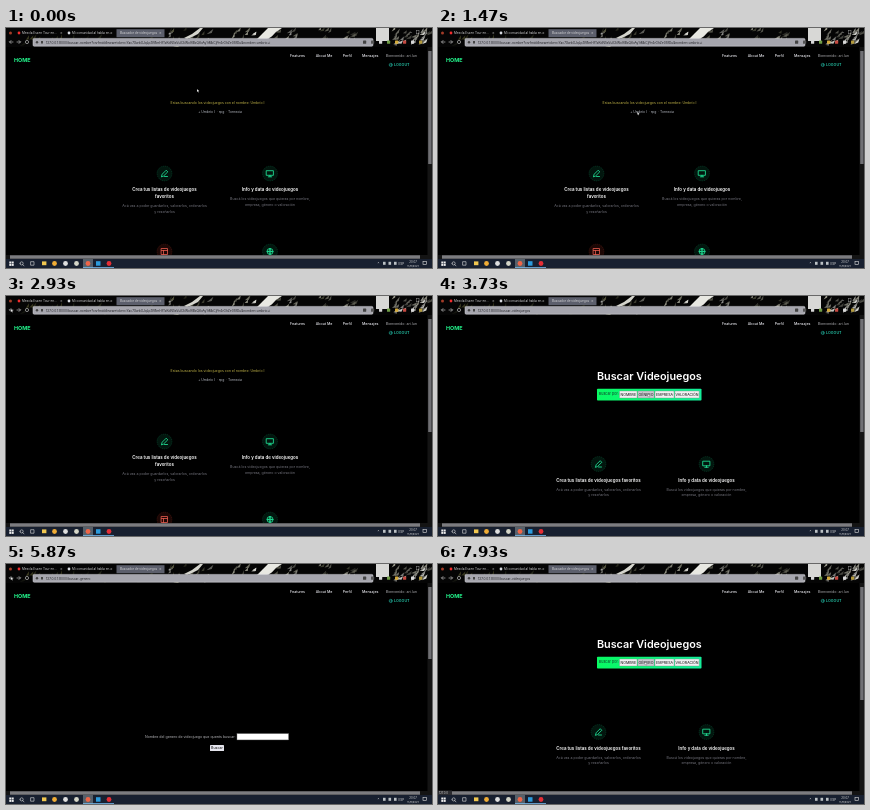
An HTML page that plays this animation: 426 px wide and 240 px high, repeating every 8000 ms.

```html
<!DOCTYPE html>
<html lang="es">
<head>
<meta charset="utf-8">
<style>
html, body { margin: 0; width: 100%; height: 100%; overflow: hidden; background: #000; }
svg { display: block; width: 100vw; height: 100vh; }
text { font-family: Inter, sans-serif; white-space: pre; }
</style>
</head>
<body>
<svg id="stage" viewBox="0 0 426 240">
  <defs>
    <linearGradient id="bar"><stop stop-color="#08fa62"/><stop offset="1" stop-color="#14ee9a"/></linearGradient>
    <clipPath id="view"><rect y="19" width="426" height="208"/></clipPath>
  </defs>
</svg>
<script>
const stage = document.getElementById('stage');
const LOOP = 8000;

function add(parent, tag, attrs, content) {
  const node = document.createElementNS('http://www.w3.org/2000/svg', tag);
  for (const key in attrs) node.setAttribute(key, attrs[key]);
  if (content) node.textContent = content;
  parent.appendChild(node);
  return node;
}
const group = (parent = stage, attrs = {}) => add(parent, 'g', attrs);
const rect = (parent, x, y, width, height, fill, extra = {}) =>
  add(parent, 'rect', { x, y, width, height, fill, ...extra });
const dot = (parent, cx, cy, r, fill) => add(parent, 'circle', { cx, cy, r, fill });
const line = (parent, d, stroke, width = 0.7) =>
  add(parent, 'path', { d, stroke, 'stroke-width': width, fill: 'none', 'stroke-linecap': 'round' });
const label = (parent, content, x, y, size, fill, extra = {}) =>
  add(parent, 'text', { x, y, 'font-size': size, fill, ...extra }, content);
const centered = (parent, content, x, y, size, fill, weight = 400) =>
  label(parent, content, x, y, size, fill, { 'text-anchor': 'middle', 'font-weight': weight });

let seed = 17;
const random = () => (seed = (seed * 16807) % 2147483647) / 2147483647;

// Browser frame
const chrome = group();
rect(chrome, 0, 0, 426, 19, '#050505');

function splatter(count, x0, x1, y0, y1, colors) {
  for (let i = 0; i < count; i++) {
    const x = x0 + random() * (x1 - x0), y = y0 + random() * (y1 - y0);
    const dx = 2 + random() * 5, dy = -2 - random() * 5;
    add(chrome, 'path', {
      d: `M${x} ${y}l${dx} ${dy}l${1 - dx * 0.4} ${2.5 - dy * 0.3}z`,
      fill: colors[i % colors.length], opacity: 0.4 + random() * 0.6
    });
  }
}
splatter(24, 162, 202, 3, 19, ['#d8d8cc', '#55553c', '#8d8d70']);
splatter(24, 225, 290, 3, 16, ['#d8d8d2', '#66665a', '#a4a494']);
splatter(16, 312, 346, 2, 17, ['#68685c', '#3c3d30', '#aaa99a']);
splatter(34, 385, 421, 3, 19, ['#e4e4de', '#77776c', '#b4b3a4']);
splatter(26, 0, 160, 11, 19, ['#3c3c20', '#54542f', '#272a1c']);
add(chrome, 'path', { d: 'M250 12l7-7 5-5h14l-6 4-5 5-9 5z', fill: '#e8e8e2' });
add(chrome, 'path', { d: 'M178 10l8-4 8-6h3l-5 6-8 4z', fill: '#d4d4cc' });

function tab(x, title, mark) {
  dot(chrome, x + 4, 5, 1.4, mark);
  label(chrome, title, x + 7, 6.2, 3.1, '#d2d2d4');
  label(chrome, '×', x + 45, 6.3, 4, '#bbb');
}
dot(chrome, 4.5, 5, 1.5, '#a33c28');
tab(9, 'Mezcla Essen Tour en…', '#f32d2d');
tab(59, 'Mi comunidad al habla en…', '#d6d9df');
rect(chrome, 110.5, 1.2, 48, 8, '#5c5f6c');
label(chrome, 'Buscador de videojuegos', 114, 6.2, 3.1, '#dadadc');
label(chrome, '×', 153, 6.3, 4, '#ccc');
label(chrome, '+', 162, 6.6, 5, '#ccc');
rect(chrome, 370, 0, 13, 13, '#d8d8d6');
label(chrome, '–   □   ×', 404, 5.5, 4.2, '#ddd');

line(chrome, 'M7 14H3.5l1.5-1.5M3.5 14l1.5 1.5M11 14h3.5l-1.5-1.5M14.5 14l-1.5 1.5', '#bbb');
add(chrome, 'circle', { cx: 21, cy: 14, r: 1.6, stroke: '#bbb', 'stroke-width': 0.7, fill: 'none' });
rect(chrome, 27, 10.4, 340, 7.8, '#a6a6ae', { rx: 1.2, stroke: '#d4d4da', 'stroke-width': 0.5 });
dot(chrome, 31, 14.3, 1.2, '#444');
rect(chrome, 35, 13, 2, 2.5, '#444');
const address = label(chrome, '', 40, 15.5, 3.2, '#242428');
['#444', '#555', '#d8d8d8', '#6f9d46', '#d3a93a', '#c64a42', '#d7d7d7', '#b39a3c']
  .forEach((color, i) => rect(chrome, 357 + i * 8, 12.6, 3.2, 3.2, color, { rx: 0.6 }));

// Page parts shared by every view
const page = group(stage, { 'clip-path': 'url(#view)' });
rect(page, 0, 19, 426, 208, '#000');
label(page, 'HOME', 8, 34.2, 5.4, '#22f58c', { 'font-weight': 700 });
[['Features', 284], ['About Me', 309.7], ['Perfil', 336.7], ['Mensajes', 356]]
  .forEach(([name, x]) => label(page, name, x, 29.3, 3.6, '#e4e4ea', { 'font-weight': 500 }));
label(page, 'Bienvenido: ari.lun', 379.7, 28.5, 3.6, '#aaaaae');
add(page, 'circle', { cx: 384.8, cy: 36.9, r: 1.6, fill: 'none', stroke: '#28d0b8', 'stroke-width': 0.5 });
line(page, 'M384 36.9h2l-.7-.7m.7.7-.7.7', '#28d0b8', 0.4);
label(page, 'LOGOUT', 388, 38.2, 3.7, '#2be6c4', { 'font-weight': 500 });

const symbols = {
  pen: 'M-3 3l.7-2.3 4-4 1.6 1.6-4 4zM0 3h3',
  screen: 'M-3.4-2.8h6.8v4.6h-6.8zM0 1.8v1.4M-1.7 3.3h3.4',
  panel: 'M-3-3h6v6h-6zM-3-1h6M-1-1v4',
  globe: 'M-3 0a3 3 0 1 0 6 0a3 3 0 1 0-6 0h6M0-3q-2.4 3 0 6q2.4-3 0-6'
};
function badge(parent, x, y, symbol, color = '#22f0a0', glow = '#02160e') {
  const icon = group(parent, { transform: `translate(${x} ${y})` });
  dot(icon, 0, 0, 7.8, glow);
  add(icon, 'circle', { r: 7.4, fill: 'none', stroke: color, 'stroke-width': 0.5, 'stroke-dasharray': '0.7 1.5', opacity: 0.35 });
  line(icon, symbols[symbol], color, 0.8);
}
function card(parent, x, iconY, symbol, titles, details) {
  badge(parent, x, iconY, symbol);
  titles.forEach((row, i) => centered(parent, row, x, iconY + 17.5 + i * 7, 4.45, '#fff', 600));
  const detailY = iconY + 19.8 + titles.length * 7;
  details.forEach((row, i) => centered(parent, row, x, detailY + i * 5.4, 3.55, '#73737c'));
}
const saveText = ['Acá vas a poder guardarlos, valorarlos, ordenarlos', 'y reseñarlos'];
const infoText = ['Buscá los videojuegos que quieras por nombre,', 'empresa, género o valoración'];

// Search results
const results = group(page);
centered(results, 'Estas buscando los videojuegos con el nombre: Umbrío I', 211.5, 76.4, 3.5, '#c2b448');
centered(results, '+ Umbrío I  · rpg  · Tornexia', 214, 85.2, 3.4, '#b4b8c0');
card(results, 158.5, 145.5, 'pen', ['Crea tus listas de videojuegos', 'favoritos'], saveText);
card(results, 264, 145.5, 'screen', ['Info y data de videojuegos'], infoText);
badge(results, 158.5, 223.5, 'panel', '#e85c4f', '#1c0705');
badge(results, 264, 223.5, 'globe');

// Search menu
const menu = group(page);
centered(menu, 'Buscar Videojuegos', 211.3, 84.2, 10.8, '#fff', 600);
rect(menu, 159, 92.8, 104.5, 11.7, 'url(#bar)', { rx: 0.8 });
label(menu, 'Buscar por:', 160.8, 99.4, 3.7, '#12372a');
const buttons = [['NOMBRE', 181.5, 17.6], ['GÉNERO', 199.8, 16.4], ['EMPRESA', 217, 19], ['VALORACIÓN', 236.8, 24.4]]
  .map(([name, x, width]) => {
    const box = rect(menu, x, 95, width, 7, '#f0f0f2', { rx: 0.6, stroke: '#777', 'stroke-width': 0.35 });
    centered(menu, name, x + width / 2, 99.9, 3.6, '#111');
    return box;
  });
card(menu, 160.5, 168, 'pen', ['Crea tus listas de videojuegos favoritos'], saveText);
card(menu, 268.5, 168, 'screen', ['Info y data de videojuegos'], infoText);

// Genre form
const form = group(page);
label(form, 'Nombre del genero de videojuego que querés buscar:', 229.5, 173.9, 3.55, '#b4b4b8', { 'text-anchor': 'end' });
rect(form, 231, 169.7, 51.5, 6.2, '#fff', { stroke: '#888', 'stroke-width': 0.4 });
rect(form, 204, 181, 14, 6, '#e4e4ec', { rx: 0.6 });
centered(form, 'Buscar', 211, 185.2, 3.6, '#111');

// Scrollbars and taskbar
const desktop = group();
rect(desktop, 421.5, 19, 4.5, 208, '#141414');
const thumb = rect(desktop, 422.2, 23, 3.4, 113, '#707074');
rect(desktop, 0, 227, 426, 4, '#141414');
rect(desktop, 4, 227.3, 410, 3.4, '#7c7c80');
const status = group(desktop);
rect(status, 0, 226.5, 14, 4.5, '#2c2c30');
label(status, '127.0.0', 1, 229.8, 2.8, '#ddd');
rect(desktop, 0, 231, 426, 9, '#182030');
[[3.3, 233.5], [5.7, 233.5], [3.3, 235.9], [5.7, 235.9]].forEach(([x, y]) => rect(desktop, x, y, 2, 2, '#eee'));
line(desktop, 'M14 235.4a1.6 1.6 0 1 0 3.2 0a1.6 1.6 0 1 0-3.2 0m2.7 1.2 1.3 1.3M25 233.7h3v3.5h-3z', '#ddd', 0.6);
rect(desktop, 77, 231, 10, 9, '#56606a');
rect(desktop, 77, 239.2, 31, 0.8, '#76b9ed');
rect(desktop, 36, 233.4, 4.4, 3.8, '#f1c750');
[[48.5, '#efac35'], [59.5, '#dedede'], [70.5, '#d4d5c7'], [82, '#ef6548'], [103, '#e52e35']]
  .forEach(([x, color]) => dot(desktop, x, 235.5, 2.4, color));
rect(desktop, 90, 233.2, 4.5, 4.5, '#2c9bdc');
label(desktop, '^', 371.5, 237, 4, '#ddd');
[377, 382.5, 388].forEach(x => rect(desktop, x, 233.8, 2.6, 3, '#bbc1c5'));
label(desktop, 'ESP', 392.5, 236.7, 3, '#ddd');
centered(desktop, '20:07', 407, 234.6, 2.8, '#ddd');
centered(desktop, '11/9/2021', 407, 238.5, 2.6, '#ddd');
rect(desktop, 417, 233.5, 3.5, 3, 'none', { stroke: '#ddd', 'stroke-width': 0.6 });

const cursor = add(stage, 'path', {
  d: 'M0 0v3l.7-.6.5 1 .6-.3-.5-1h.9z', fill: '#fff', stroke: '#222', 'stroke-width': 0.2
});

// Pointer stops: time, x, y
const stops = [
  [0, 191, 61], [800, 172, 43], [1300, 190, 75], [2130, 275, 155], [2900, 5, 13], [3100, 5, 13],
  [3730, 210, 98], [4350, 210, 98], [4930, 226.5, 100], [5800, 5, 13], [6100, 5, 13],
  [6800, 169, 81], [7650, 207, 98], [8000, 207, 98]
];
function pointerAt(time) {
  const next = Math.max(1, stops.findIndex(stop => stop[0] > time));
  const [t0, x0, y0] = stops[next - 1], [t1, x1, y1] = stops[next];
  const p = (time - t0) / (t1 - t0), ease = p * p * (3 - 2 * p);
  return [x0 + (x1 - x0) * ease, y0 + (y1 - y0) * ease];
}
function show(node, visible) {
  node.setAttribute('display', visible ? 'inline' : 'none');
}

const host = '127.0.0.1:8000/';
const resultsUrl = host + 'buscar-nombre?csrfmiddlewaretoken=Yac7XwbGJqLp3R8mHfTzKdN5sVuE2iWo9lBxQ6vAy1tMkCjPn4rGhZe0SfDu&nombre=umbrio+i';

function render(now) {
  const time = now % LOOP;
  const current = time < 3000 ? results : time >= 4330 && time < 6000 ? form : menu;
  [results, menu, form].forEach(view => show(view, view === current));
  address.textContent = current === results ? resultsUrl : host + (current === form ? 'buscar-genero' : 'buscar-videojuegos');
  thumb.setAttribute('height', current === form ? 72 : 113);
  const [x, y] = pointerAt(time);
  cursor.setAttribute('transform', `translate(${x} ${y})`);
  const overGenre = current === menu && x > 199.8 && x < 216.2 && y > 95 && y < 102;
  buttons[1].setAttribute('fill', overGenre ? '#c9c9d0' : '#f0f0f2');
  show(status, time >= 7870);
  requestAnimationFrame(render);
}
requestAnimationFrame(render);
</script>
</body>
</html>
```
